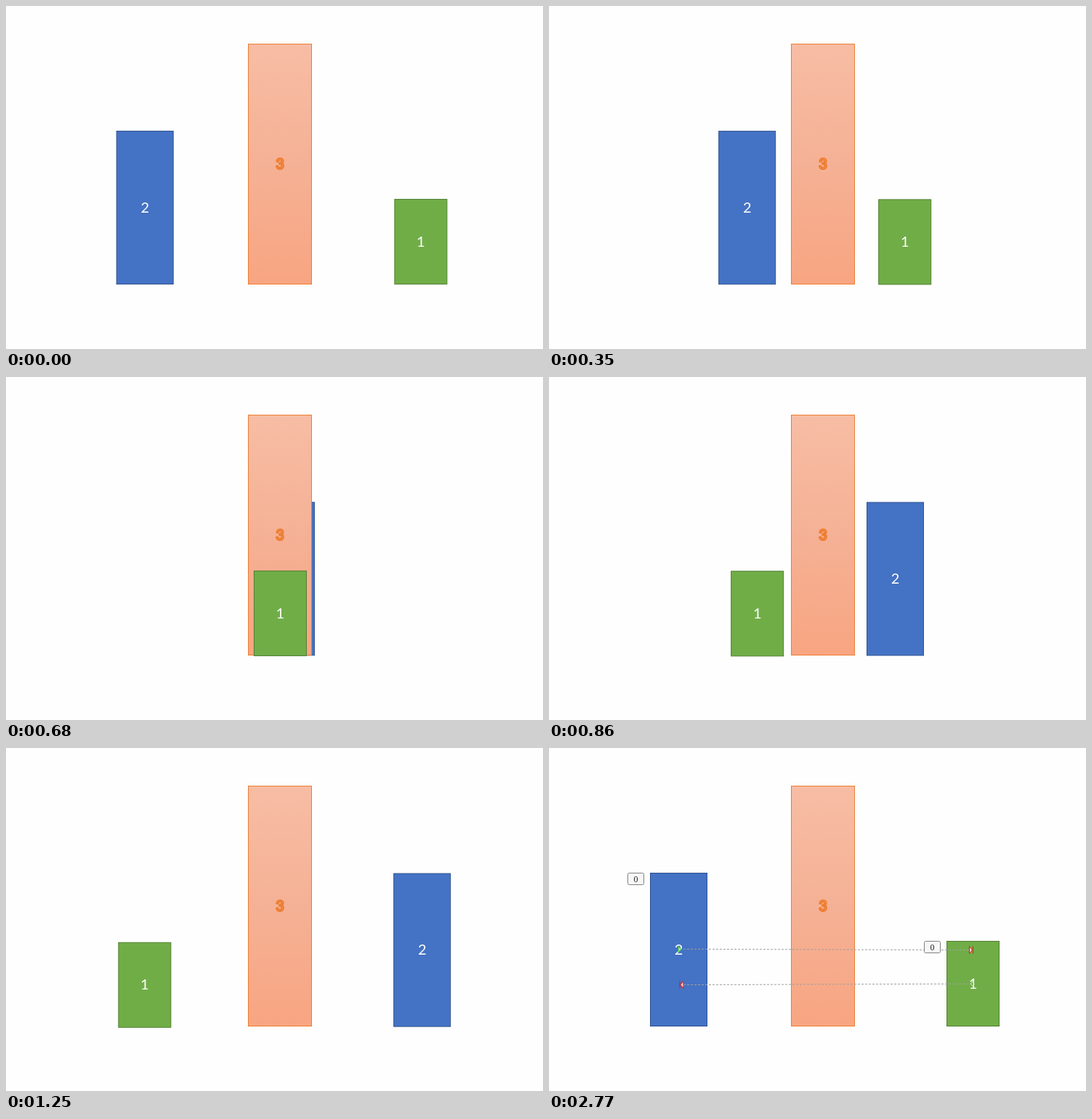
These frames come from a looping animation (739 px wide and 473 px high, 2.87 s). An HTML page with a canvas:

```html
<!DOCTYPE html>
<html lang="en">
<head>
<meta charset="utf-8">
<style>
  html, body { margin: 0; height: 100%; overflow: hidden; background: #fefefe; }
  canvas { display: block; }
</style>
</head>
<body>
<canvas id="stage" width="739" height="473"></canvas>
<script>
const ctx = document.getElementById('stage').getContext('2d');
const LOOP = 2870, EDIT_START = 2770, LAST_STEP = 27;

const peach = ctx.createLinearGradient(0, 52, 0, 384);
peach.addColorStop(0, '#f7bda4');
peach.addColorStop(0.5, '#f5b195');
peach.addColorStop(1, '#f8a581');

const blue = { x: 139.5, y: 172.5, w: 78, h: 211, dx: 404.3, dy: 0.6, fill: '#4472c4', line: '#2f528f', label: '2' };
const green = { x: 547.5, y: 266.5, w: 72, h: 117, dx: -402.7, dy: 1.8, fill: '#70ad47', line: '#507e32', label: '1' };
const orange = { x: 333.5, y: 52.5, w: 87, h: 331, dx: 0, dy: 0, fill: peach, line: '#ed7d31', label: '3' };

const clamp = v => Math.min(1, Math.max(0, v));
const smoother = u => u * u * u * (10 - 15 * u + 6 * u * u);

// The bars advance in uneven 50-60 ms ticks.
function stepAt(t) {
  let n = 0;
  while (n < LAST_STEP && Math.ceil((n + 1) * 5.68) * 10 <= t) n++;
  return n;
}

function drawBar(bar, p) {
  const x = bar.x + bar.dx * p, y = bar.y + bar.dy * p;
  const cx = x + bar.w / 2, baseline = y + bar.h / 2 + 6.7;
  ctx.lineWidth = 1;
  ctx.fillStyle = bar.fill;
  ctx.strokeStyle = bar.line;
  ctx.fillRect(x, y, bar.w, bar.h);
  ctx.strokeRect(x, y, bar.w, bar.h);
  ctx.textAlign = 'center';
  if (bar === orange) {
    ctx.font = 'bold 20px Lato, sans-serif';
    ctx.fillStyle = '#f4a070';
    ctx.fillText(bar.label, cx, baseline);
    ctx.lineWidth = 2;
    ctx.lineJoin = 'round';
    ctx.strokeText(bar.label, cx, baseline);
    ctx.lineJoin = 'miter';
  } else {
    ctx.font = '20px Lato, sans-serif';
    ctx.fillStyle = '#fff';
    ctx.fillText(bar.label, cx, baseline);
  }
}

function drawPath(x1, y1, x2, y2) {
  ctx.strokeStyle = '#a0a0a0';
  ctx.lineWidth = 1;
  ctx.setLineDash([3, 2]);
  ctx.beginPath();
  ctx.moveTo(x1, y1);
  ctx.lineTo(x2, y2);
  ctx.stroke();
  ctx.setLineDash([]);
}

// Triangle pointing in direction dir, with an optional stop bar at its tip.
function drawMarker(x, y, dir, fill, line, stop) {
  const size = stop ? 5 : 4;
  ctx.fillStyle = fill;
  ctx.strokeStyle = line;
  ctx.lineWidth = 1;
  ctx.beginPath();
  ctx.moveTo(x - 2 * dir, y - size);
  ctx.lineTo(x + 2 * dir, y);
  ctx.lineTo(x - 2 * dir, y + size);
  ctx.closePath();
  ctx.fill();
  ctx.stroke();
  if (stop) {
    ctx.beginPath();
    ctx.moveTo(x + 3 * dir, y - size);
    ctx.lineTo(x + 3 * dir, y + size);
    ctx.stroke();
  }
}

function drawTag(x, y) {
  ctx.fillStyle = '#f7f7f7';
  ctx.strokeStyle = '#808080';
  ctx.lineWidth = 1;
  ctx.beginPath();
  ctx.roundRect(x + 0.5, y + 0.5, 22, 16, 2);
  ctx.fill();
  ctx.stroke();
  ctx.font = '12px "Liberation Serif", serif';
  ctx.fillStyle = '#222';
  ctx.fillText('0', x + 11.5, y + 13);
}

function drawEditMarks() {
  drawPath(180, 277.3, 580, 278.6);
  drawPath(583, 325.2, 183, 326.6);
  drawMarker(180, 277.5, 1, '#b5e6a2', '#35c435', false);
  drawMarker(582, 325.2, -1, '#70ad47', '#e2f2d8', false);
  drawMarker(580.5, 278.5, 1, '#f4d0d0', '#e01818', true);
  drawMarker(183, 326.5, -1, '#f4d0d0', '#e01818', true);
  drawTag(108, 172);
  drawTag(516, 266);
}

function render(now) {
  const t = now % LOOP, editing = t >= EDIT_START;
  const p = editing ? 0 : smoother(clamp(0.5 + (stepAt(t) - 10.8) / 31.7));
  ctx.fillStyle = '#fefefe';
  ctx.fillRect(0, 0, 739, 473);
  drawBar(blue, p);
  drawBar(orange, p);
  drawBar(green, p);
  if (editing) drawEditMarks();
}

const start = performance.now();
function tick() {
  render(performance.now() - start);
  requestAnimationFrame(tick);
}
tick();
</script>
</body>
</html>
```
